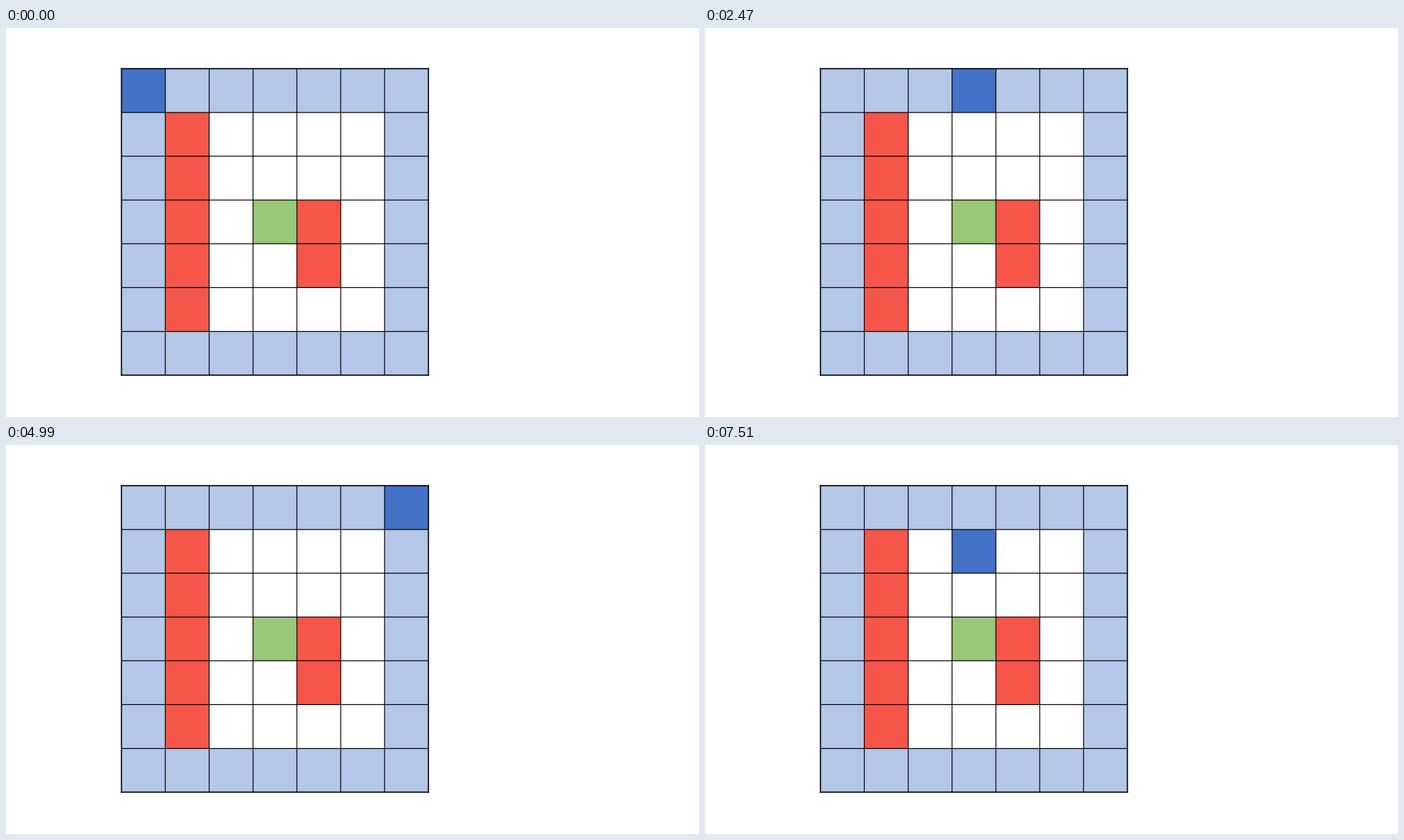
An HTML page that plays this animation: 998x561 px, repeating every 8 s.

```html
<!DOCTYPE html>
<html lang="en">
<head>
<meta charset="utf-8">
<title>Grid scan</title>
<style>
html, body { margin: 0; width: 100%; height: 100%; overflow: hidden; background: #fff; }
svg { display: block; width: 100%; height: 100%; }
</style>
</head>
<body>
<svg id="stage" viewBox="0 0 998 561"></svg>
<script>
const N = 7, X0 = 166.3, Y0 = 58.6, SIZE = 63.15;
const LOOP = 8000, FIRST = 790, STEP = 840;
const COLORS = { border: '#b4c7e7', wall: '#f65649', goal: '#9ac87b', cursor: '#4472c6', empty: '#fff' };
const stage = document.getElementById('stage');
const px = c => X0 + c * SIZE;
const py = r => Y0 + r * SIZE;

function add(tag, attrs) {
  const el = document.createElementNS('http://www.w3.org/2000/svg', tag);
  for (const k in attrs) el.setAttribute(k, attrs[k]);
  return stage.appendChild(el);
}

function cell(c, r, kind) {
  return add('rect', {
    x: px(c), y: py(r), width: SIZE, height: SIZE,
    fill: COLORS[kind], 'shape-rendering': 'crispEdges'
  });
}

function kindOf(c, r) {
  if (c % (N - 1) === 0 || r % (N - 1) === 0) return 'border';
  if (c === 1 || (c === 4 && (r === 3 || r === 4))) return 'wall';
  return c === 3 && r === 3 ? 'goal' : 'empty';
}

// The cursor visits cells row by row and skips walls.
const route = [];
for (let r = 0; r < N; r++) {
  for (let c = 0; c < N; c++) {
    const kind = kindOf(c, r);
    cell(c, r, kind);
    if (kind !== 'wall') route.push([c, r]);
  }
}

const cursor = cell(0, 0, 'cursor');

for (let i = 0; i <= N; i++) {
  const edge = i % N === 0;
  const style = { stroke: '#000', 'stroke-width': edge ? 1.7 : 1.25, 'stroke-linecap': edge ? 'square' : 'butt' };
  add('line', { x1: px(i), y1: py(0), x2: px(i), y2: py(N), ...style });
  add('line', { x1: px(0), y1: py(i), x2: px(N), y2: py(i), ...style });
}

function draw(t) {
  const step = t < FIRST ? 0 : 1 + Math.floor((t - FIRST) / STEP);
  const [c, r] = route[step];
  cursor.setAttribute('x', px(c));
  cursor.setAttribute('y', py(r));
}

const start = performance.now();
function tick() {
  draw((performance.now() - start) % LOOP);
  requestAnimationFrame(tick);
}
tick();
</script>
</body>
</html>
```
